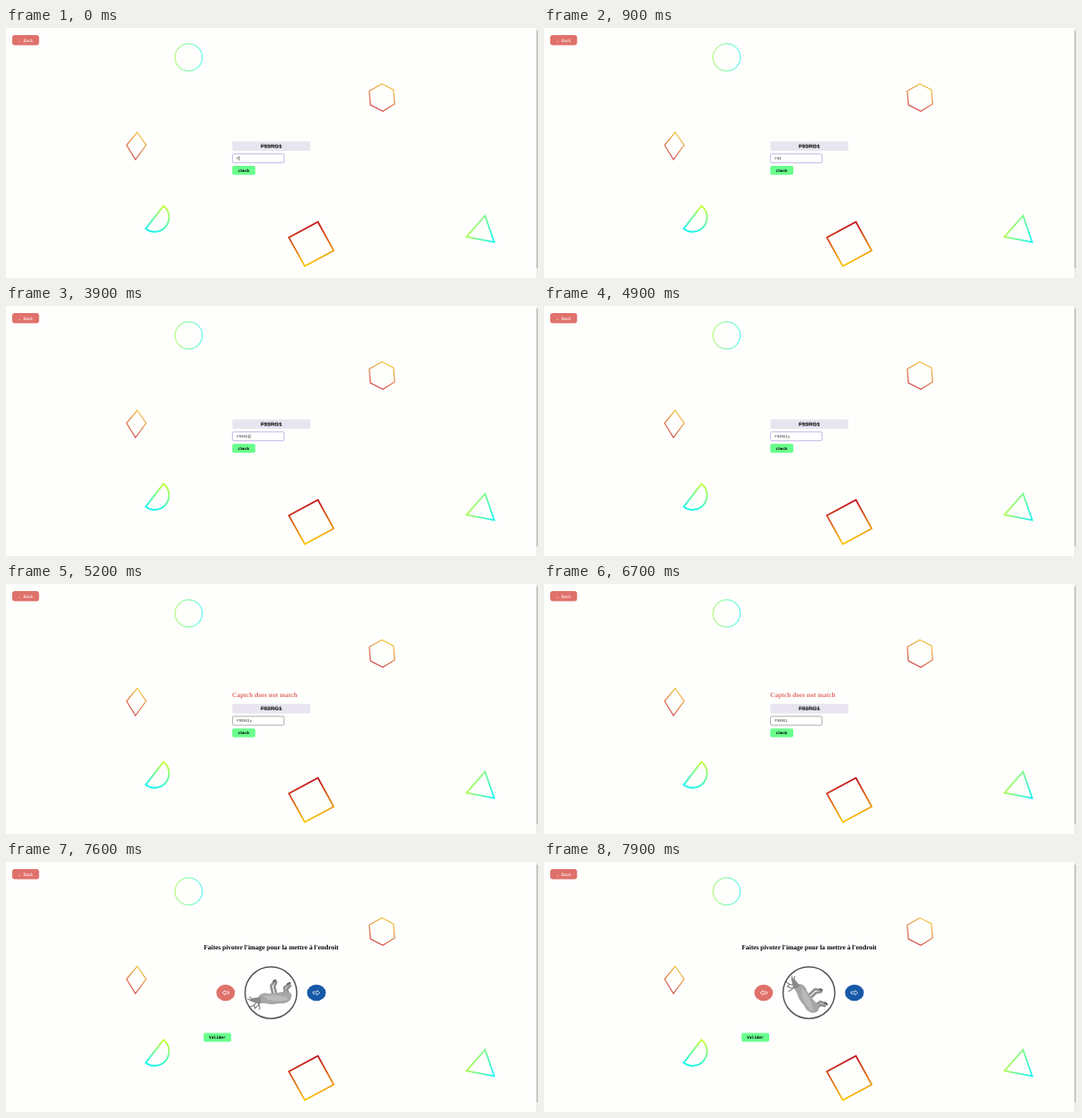
Animation, 600 px wide and 283 px high, one loop 8 s. Source, as an HTML page:

```html
<!DOCTYPE html>
<html lang="fr">
<head>
<meta charset="utf-8">
<title>Captcha</title>
<style>
  html, body { margin: 0; width: 100%; height: 100%; overflow: hidden; background: #fefefc; }
  svg { display: block; width: 600px; height: 283px; }
  text { text-rendering: geometricPrecision; }
  .sans { font-family: "Liberation Sans", Arial, sans-serif; }
  .serif { font: bold 7.52px "Liberation Serif", Times, serif; }
  .mono { font-family: "DejaVu Sans Mono", monospace; }
  .btn { font-size: 4.4px; font-weight: bold; text-anchor: middle; }
  .shapes { fill: none; stroke-linejoin: miter; }
</style>
</head>
<body>
<svg viewBox="0 0 600 283">
  <defs>
    <linearGradient id="limeRight">
      <stop offset="0" stop-color="#b4fa78"/><stop offset="1" stop-color="#5cf6f2"/>
    </linearGradient>
    <linearGradient id="limeDown" x1=".7" y1="0" x2=".4" y2="1">
      <stop offset="0" stop-color="#c6ff3c"/><stop offset="1" stop-color="#1cf5ee"/>
    </linearGradient>
    <linearGradient id="limeSide" x1="0" y1=".4" x2="1" y2=".8">
      <stop offset="0" stop-color="#c6ff3c"/><stop offset="1" stop-color="#1cf5ee"/>
    </linearGradient>
    <linearGradient id="sunTop" x1=".75" y1="0" x2=".3" y2="1">
      <stop offset="0" stop-color="#f5cc3c"/><stop offset="1" stop-color="#cf4048"/>
    </linearGradient>
    <linearGradient id="sunLow" x1=".4" y1="0" x2=".6" y2="1">
      <stop offset=".1" stop-color="#c4161c"/><stop offset="1" stop-color="#ffd000"/>
    </linearGradient>
    <clipPath id="lens"><circle r="29"/></clipPath>
  </defs>

  <rect width="600" height="283" fill="#fefefc"/>
  <rect x="598" width="2" height="283" fill="#ececec"/>
  <rect x="598.4" y="3" width="1.3" height="269" rx=".6" fill="#b4b4b4"/>

  <rect x="7" y="8" width="30.3" height="11.4" rx="3" fill="#e0716b"/>
  <text class="sans" x="13" y="15.5" font-size="5" fill="#fff">← Back</text>

  <g class="shapes">
    <circle cx="206" cy="33.3" r="15.4" stroke="url(#limeRight)" stroke-width="1.2"/>
    <path d="M424 63.3L437 70 438.3 86 425 94.3 411 87 409.7 71.3Z" stroke="url(#sunTop)" stroke-width="1.2"/>
    <path d="M148 118L158 132.5 146 149 136 132.5Z" stroke="url(#sunTop)" stroke-width="1.2"/>
    <path d="M177.5 201.3A16.3 16.3 0 0 1 157.5 227.3Z" stroke="url(#limeDown)" stroke-width="1.9"/>
    <path d="M351.8 219.5L369.6 252 337 269.6 319 237.2Z" stroke="url(#sunLow)" stroke-width="1.7"/>
    <path d="M540.3 212.5L550.6 242.3 519.3 236.5Z" stroke="url(#limeSide)" stroke-width="1.8"/>
  </g>

  <g id="typePage">
    <text id="error" class="serif" x="255" y="127.7" fill="#e0716b">Captch does not match</text>
    <g id="form">
      <rect x="255.3" y="128.4" width="87.9" height="10.7" rx="1" fill="#e8e4f0"/>
      <text class="sans" x="299.2" y="135.9" font-size="6.35" font-weight="bold" text-anchor="middle" fill="#222">F93RG1</text>
      <rect x="287" y="133.4" width="24.3" height=".7" fill="#222"/>
      <rect id="field" x="255.4" y="142.5" width="58.2" height="10.1" rx="1.5" fill="#fff" stroke-width=".8"/>
      <text id="entry" class="mono" x="260.3" y="149" font-size="4" fill="#333"></text>
      <rect id="caret" y="145.1" width=".6" height="4.9" fill="#333"/>
      <rect x="255.2" y="156.1" width="26" height="10.1" rx="2" fill="#69ff8d"/>
      <text class="mono btn" x="268.1" y="162.7">check</text>
    </g>
  </g>

  <g id="turnPage">
    <text class="serif" x="223" y="99.3">Faites pivoter l'image pour la mettre à l'endroit</text>
    <ellipse cx="247.7" cy="148" rx="10.5" ry="9.3" fill="#e0716b"/>
    <ellipse cx="350.1" cy="148" rx="10.6" ry="9.3" fill="#1759a8"/>
    <g fill="none" stroke="#fff" stroke-width=".7">
      <path id="arrow" d="M243.9 148l3-2.6v1.5h4.6v2.2h-4.6v1.5z"/>
      <use href="#arrow" transform="translate(597.8 0) scale(-1 1)"/>
    </g>
    <g transform="translate(298.8 148)">
      <circle r="29.2" fill="#fff"/>
      <g clip-path="url(#lens)">
        <g id="deer" stroke-linecap="round" stroke-linejoin="round">
          <g fill="none" stroke="#8d8d8d">
            <path d="M2 1L0-8 4-13M6 1L4-7 6-12M16 3L15-6 20-10M21 4L18-4 22-8" stroke-width="2.6"/>
            <path d="M3-13l2-1M19-10l2.4-1" stroke="#666" stroke-width="2.4"/>
            <path d="M-17 9q-5 1-9 -2M-20 8.6l-4-4M-16 10q-3 6-9 6M-19 14l1 4M-15 10q3 4 2 9M-13.5 14l-4 3" stroke="#858585" stroke-width="1.2"/>
          </g>
          <path d="M-13 3Q-9-1-3 1L8 0Q17-3 22 0 25 4 21 9 16 13 9 12 1 14-6 12L-15 12Q-18 9-13 3Z" fill="#a6a6a6"/>
          <path d="M-9 4Q2 1 13 4 20 4 19 8 8 11-3 8Z" fill="#bababa"/>
          <path d="M-12 5L-20 6Q-25 7-23 9.5L-16 12-11 10Z" fill="#8a8a8a"/>
          <path d="M-14 10l-1 4 3-2z" fill="#777"/>
        </g>
      </g>
      <circle r="29.2" fill="none" stroke="#555" stroke-width="1.5"/>
    </g>
    <rect x="222.8" y="193.5" width="31.2" height="10" rx="2" fill="#69ff8d"/>
    <text class="mono btn" x="238.3" y="200.1">Valider</text>
  </g>
</svg>
<script>
  const LOOP = 8000, ERROR_AT = 5200, TURN_AT = 6800;
  const CHAR = 2.41, SHIFT = 7.3, TURN = 20;
  const $ = id => document.getElementById(id);

  // [start, typed text, caret visible]
  const typing = [
    [0, "F", 1], [400, "F9", 1], [500, "F93", 1], [900, "F93", 0], [1300, "F93", 1],
    [1700, "F93", 0], [2000, "F93R", 1], [2300, "F93RG", 1], [2700, "F93RG", 0],
    [3100, "F93RG1", 1], [3500, "F93RG1", 0], [3900, "F93RG1", 1], [4300, "F93RG1", 0],
    [4500, "F93RG1y", 1], [4900, "F93RG1y", 0], [5700, "F93RG1y", 1],
    [6100, "F93RG1", 1], [6500, "F93RG1", 0]
  ];
  const turns = [7300, 7400, 7600, 7700, 7800, 7900];
  const START_ANGLE = -3 * TURN;

  const show = (id, on) => $(id).setAttribute("visibility", on ? "visible" : "hidden");

  function draw(t) {
    const turning = t >= TURN_AT;
    const failed = t >= ERROR_AT;
    const [, text, caret] = typing.findLast(row => row[0] <= t);
    const focused = t < ERROR_AT || (t >= 5700 && t < 6700);

    $("typePage").style.display = turning ? "none" : "";
    $("turnPage").style.display = turning ? "" : "none";

    show("error", failed);
    $("form").setAttribute("transform", `translate(0 ${failed ? SHIFT : 0})`);
    $("field").setAttribute("stroke", focused ? "#b8a9e2" : "#999");
    $("entry").textContent = text;
    $("caret").setAttribute("x", 260.3 + text.length * CHAR);
    show("caret", caret);

    const angle = START_ANGLE + TURN * turns.filter(at => at <= t).length;
    $("deer").setAttribute("transform", `rotate(${angle})`);
  }

  const start = performance.now();
  function tick() {
    draw((performance.now() - start) % LOOP);
    requestAnimationFrame(tick);
  }
  tick();
</script>
</body>
</html>
```
